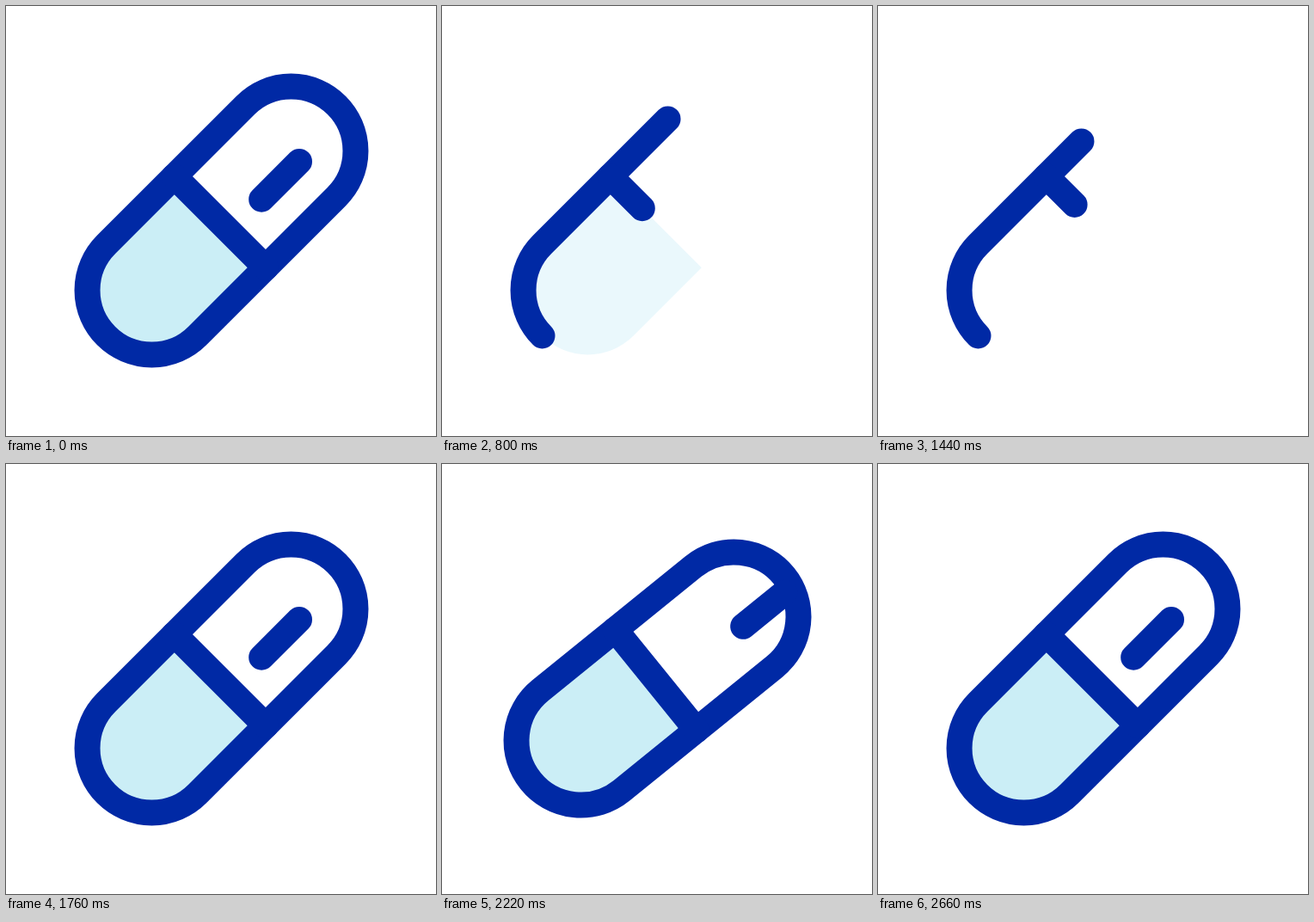
These frames come from a looping animation (500x500 px, 3000 ms). An HTML page:

```html
<!DOCTYPE html>
<html lang="en">
<head>
<meta charset="utf-8">
<title>Pill</title>
<style>
  html, body { margin: 0; width: 100%; height: 100%; overflow: hidden; background: #fff; }
  svg { display: block; width: 100%; height: 100%; }
  .line { fill: none; stroke: #0029a5; stroke-width: 30; stroke-linecap: round; }
</style>
</head>
<body>
<svg viewBox="0 0 500 500">
  <g id="pill">
    <path id="fill" fill="#cbeef6" d="M-2.4-75H-114.5A75 75 0 0 0-114.5 75H-2.4Z"/>
    <path id="outline" class="line" pathLength="1"
      d="M-189.5 0A75 75 0 0 1-114.5-75H114.5A75 75 0 0 1 114.5 75H-114.5A75 75 0 0 1-189.5 0"/>
    <path id="divider" class="line" pathLength="1" d="M-2.4-75V75"/>
    <path id="shine" class="line" pathLength="1" d="M50.5 15.5H112.5"/>
  </g>
</svg>
<script>
const LOOP = 3000;
const [pill, fill, outline, divider, shine] =
  ['pill', 'fill', 'outline', 'divider', 'shine'].map(id => document.getElementById(id));

const progress = (t, from, to) => Math.min(1, Math.max(0, (t - from) / (to - from)));
const ease = (t, from, to) => {
  const x = progress(t, from, to);
  return x * x * (3 - 2 * x);
};

function trim(path, amount) {
  path.style.visibility = amount > 0 ? 'visible' : 'hidden';
  path.setAttribute('stroke-dasharray', `${amount} 2`);
}

function draw(t) {
  // Erase, then redraw
  const drawn = 1 - ease(t, 500, 1000) + ease(t, 1256, 1756);
  trim(outline, drawn);
  trim(divider, drawn);
  trim(shine, 1 - ease(t, 500, 780) + ease(t, 1476, 1756));
  fill.setAttribute('opacity', 1 - progress(t, 500, 1000) + ease(t, 1440, 1756));

  // Rock, with the highlight sliding along the pill
  const tilt = 10 * ease(t, 2000, 2165) - 20 * ease(t, 2165, 2360) + 10 * ease(t, 2360, 2542);
  const slide = 67 * (ease(t, 2000, 2245) - ease(t, 2410, 2662));
  pill.setAttribute('transform', `translate(250.5 249.5) rotate(${tilt - 45})`);
  shine.setAttribute('transform', `translate(${slide})`);
}

function tick() {
  draw(performance.now() % LOOP);
  requestAnimationFrame(tick);
}
tick();
</script>
</body>
</html>
```
